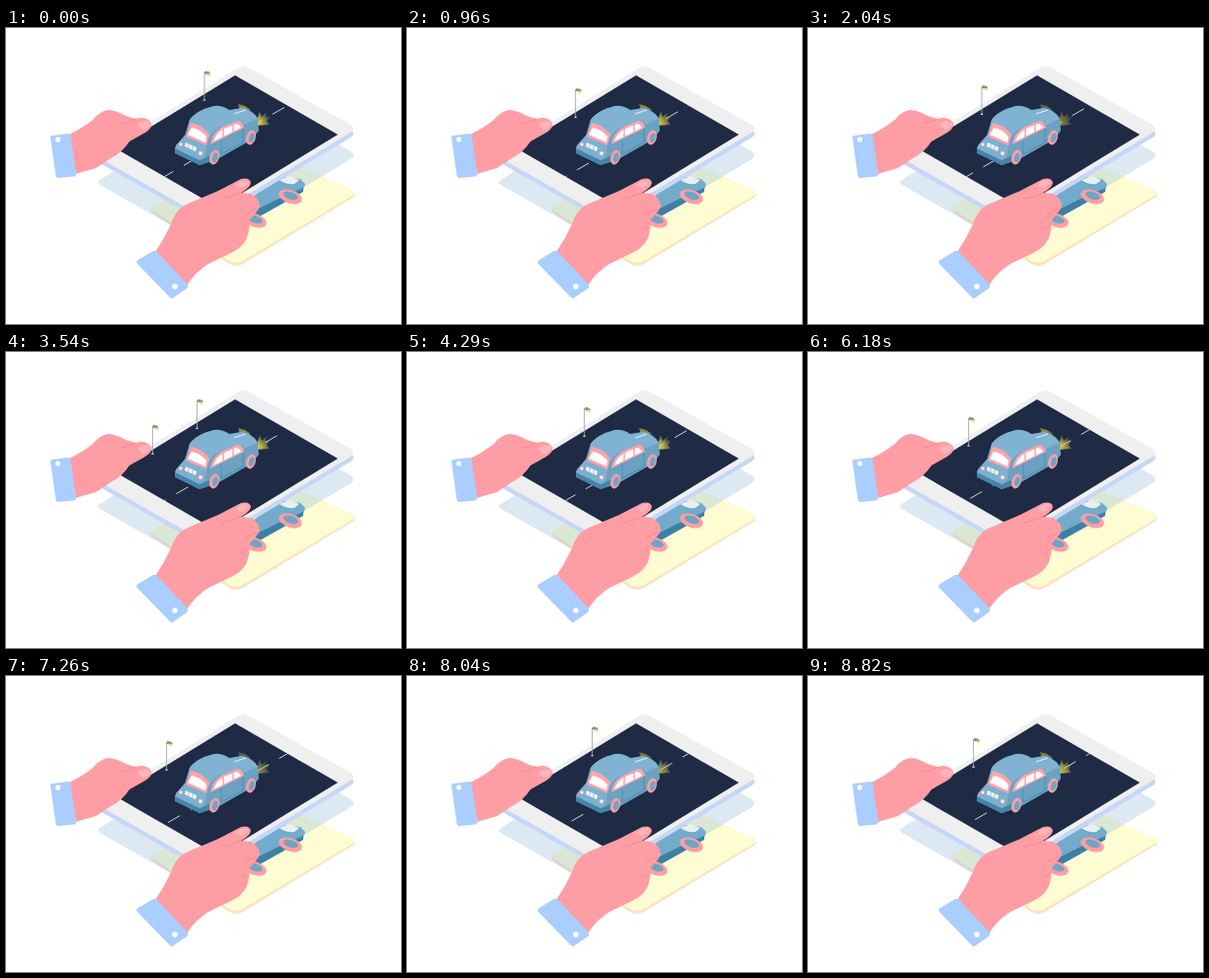
An HTML page that plays this animation: 400x300 px, repeating every 8.85 s.

```html
<!DOCTYPE html>
<html lang="en">
<head>
<meta charset="utf-8">
<title>Tablet drive</title>
<style>
  html, body { margin: 0; width: 100%; height: 100%; overflow: hidden; background: #fff; }
  svg { display: block; width: 400px; height: 300px; }
</style>
</head>
<body>
<svg viewBox="0 0 400 300">
  <defs>
    <radialGradient id="glow" gradientUnits="userSpaceOnUse" cx="253" cy="98" r="17">
      <stop offset="0" stop-color="#fff04e"/>
      <stop offset=".45" stop-color="#d8cd48" stop-opacity=".75"/>
      <stop offset="1" stop-color="#d8d27a" stop-opacity="0"/>
    </radialGradient>
    <clipPath id="screen"><path d="M232 48L336 108L215 182L111 122Z"/></clipPath>
    <path id="slab" d="M95 127L234 41Q241 37 247 41L349 98Q355 102 349 106L209 190Q203 194 197 190L95 132Q91 129 95 127Z"/>
    <g id="lamp">
      <path d="M0 0V-28" stroke="#a3a7b1" stroke-width=".9"/>
      <path d="M-1.200 0H1.200" stroke="#d2d5dd" stroke-width="1.2"/>
      <path d="M-.5-27L1-29.500L5-28.500L6.500-26L3-25.500Z" fill="#8b8f98"/>
      <path d="M2-26.500L6.500-26.500L5.500-24L2.500-24.500Z" fill="#f4e76a"/>
    </g>
    <g id="wheel">
      <ellipse rx="4.800" ry="7.600" fill="#ff9da4"/>
      <ellipse cx=".8" rx="2.600" ry="4.800" fill="#6da5c4"/>
    </g>
  </defs>

  <!-- paper card -->
  <path d="M272 131L351 166Q356 169 351 172L240 239Q233 243 226 239L149 188Q144 184 149 181Z" fill="#fde2c0"/>
  <path d="M272 129L351 164Q356 167 351 170L240 236Q233 240 226 236L149 185Q144 182 149 179Z" fill="#fdfcd3"/>

  <!-- floating sheet -->
  <use href="#slab" y="27" fill="#8db5d8" fill-opacity=".3"/>

  <!-- printed car -->
  <path d="M235 185L256 166L282 151L298 153L303 158L301 164L278 173L266 185L244 195Z" fill="#72abcb"/>
  <path d="M242 190L274 174L301 162L301 166L280 178L248 196Z" fill="#3f7fa5"/>
  <path d="M277 154L287 150L297 154L292 158Q283 159 277 154Z" fill="#e6f1f0"/>
  <use href="#wheel" transform="translate(288 171) rotate(-72) scale(1.4 1.6)"/>
  <use href="#wheel" transform="translate(252 195) rotate(-72) scale(1.4 1.6)"/>

  <!-- tablet -->
  <use href="#slab" y="5" fill="#c6d6f7"/>
  <use href="#slab" fill="#efefef"/>
  <path d="M232 48L336 108L215 182L111 122Z" fill="#1f2a44"/>

  <g clip-path="url(#screen)"><g id="dashes" stroke="#e3e6ec" stroke-width=".9"></g></g>
  <g id="lamps"></g>

  <g id="beams" fill="url(#glow)">
    <path d="M252 99L257 84L259 90L265 84L263 90L269 89L264 94L267 98Z"/>
    <path d="M252 99L249 89L256 91L262 95Z" transform="translate(-14 -12)" opacity=".75"/>
  </g>

  <!-- car -->
  <path d="M171 121L181 109L186 93Q190 87 201 82L211 79Q218 78 226 83L239 81Q251 84 255 92L256 104L249 113L214 133L196 139L171 126Z" fill="#6ba2c2"/>
  <path d="M186 93Q190 87 201 82L211 79Q219 78 229 85Q237 88 239 95L220 99Q209 104 205 112L184 102Z" fill="#80b3d1"/>
  <path d="M226 84L239 81Q251 84 255 92L241 98Q238 90 229 86Z" fill="#80b3d1"/>
  <path d="M231 87L243 83" stroke="#dbecf3" stroke-width="1.1"/>
  <path d="M172 119L181 109L203 118L202 129L197 136L172 124Z" fill="#7cb0d0"/>
  <path d="M171 122L196 134L208 129V134L196 139L171 127Z" fill="#4585aa"/>
  <path d="M182 110L187 96Q197 97 206 108L203 119Z" fill="#ffa3aa"/>
  <path d="M184 108L188 101Q196 102 203 110L202 116Z" fill="#fff"/>
  <path d="M207 118Q208 107 219 100L235 94Q240 95 241 101Z" fill="#ffa3aa"/>
  <path d="M210 115Q212 107 221 102L233 97Q237 98 238 101Z" fill="#fff"/>
  <path d="M220 101V111M230 97V106" stroke="#ffa3aa" stroke-width="1.500"/>
  <path d="M218 114V128M218 128L240 116V102" fill="none" stroke="#4585aa" stroke-width=".7"/>
  <path d="M182 116L193 121L192 125L181 120Z" fill="#f4f8fa"/>
  <path d="M185 117.500V121.500M189 119.500V123.500" stroke="#80a8bf" stroke-width=".8"/>
  <g fill="#fff" stroke="#ffa3aa" stroke-width=".8">
    <circle cx="177" cy="118" r="1.700"/><circle cx="197" cy="127" r="2"/>
  </g>
  <use href="#wheel" transform="translate(211 131) rotate(16)"/>
  <use href="#wheel" transform="translate(248 111) rotate(16)"/>

  <!-- left hand -->
  <path d="M64 108Q78 101 88 93Q95 84 104 83Q113 84 121 89L131 92Q142 89 147 96Q149 101 141 106L125 115Q118 126 106 132L91 142Q80 145 71 148Z" fill="#ff9da4"/>
  <path d="M133 98Q139 92 146 96Q147 100 139 104Z" fill="#ffb5b9"/>
  <path d="M131 92Q124 97 116 97" fill="none" stroke="#f28490" stroke-width=".8"/>
  <path d="M47 109L63 107Q65 107 65.500 109L71 148Q71 150 69 150.500L53 152Q51 152 50.500 150L45 111Q45 109 47 109Z" fill="#a9ceff"/>
  <circle cx="52.500" cy="113" r="2.600" fill="#fff"/>

  <!-- right hand -->
  <path d="M150 229Q160 214 167 199Q171 185 182 179L215 165L238 153Q247 151 248 157Q247 162 238 167L248 168Q257 173 257 181Q254 187 247 194Q247 204 244 213Q239 223 228 228L205 239Q192 247 183 261Z" fill="#ff9da4"/>
  <path d="M232 160Q237 153 244 154Q247 158 239 162Z" fill="#ffb5b9"/>
  <path d="M238 167Q227 172 218 173M254 183Q246 186 241 189M244 200Q241 203 238 204" fill="none" stroke="#f28490" stroke-width=".8"/>
  <path d="M134 235L149 226Q151 225 153 227L184 260Q185 262 183 264L170 273Q168 275 166 273L133 239Q131 237 134 235Z" fill="#a9ceff"/>
  <circle cx="171" cy="262" r="2.800" fill="#fff"/>
</svg>
<script>
  const LOOP = 8.85, GAP = 45, SLOPE = 0.577;
  const pick = id => document.getElementById(id);

  // Lamp gaps travelled; the drive speeds up a little late in the loop.
  const travelled = t => 1.742 * t + 0.11 * Math.max(0, t - 5.4);

  function lampMarks(gaps) {
    let out = "";
    for (let k = Math.floor(gaps); k >= 0; k--) {
      const x = 201 - GAP * (gaps - k);
      if (x < 146) break;
      out += `<use href="#lamp" transform="translate(${x} ${73 + (201 - x) * SLOPE})"/>`;
    }
    return out;
  }

  function dashMarks(gaps) {
    const step = GAP / 2, shift = gaps * GAP % step;
    const y = x => 152 - (x - 158) * SLOPE;
    let out = "";
    for (let x = 270 - shift + step; x > 130; x -= step)
      out += `<path d="M${x} ${y(x)}L${x + 12} ${y(x + 12)}"/>`;
    return out;
  }

  function draw(now) {
    const t = now / 1000 % LOOP, gaps = travelled(t);
    pick("lamps").innerHTML = lampMarks(gaps);
    pick("dashes").innerHTML = dashMarks(gaps);
    pick("beams").setAttribute("opacity", 0.72 + 0.28 * Math.cos(2 * Math.PI * t / 0.87));
    requestAnimationFrame(draw);
  }
  draw(0);
</script>
</body>
</html>
```
